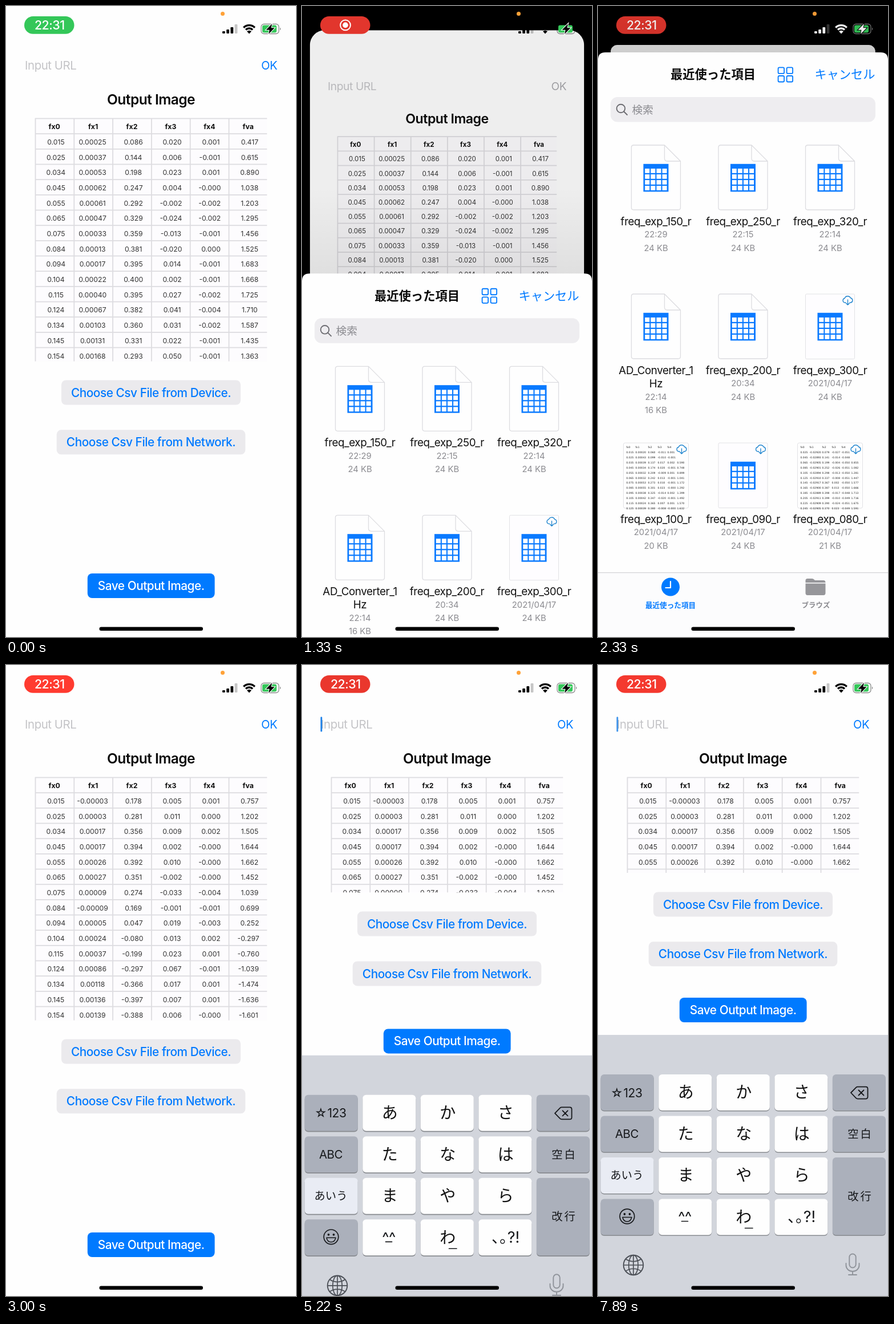
Write an HTML page that moves like this. It is 508 by 1102 pixels and loops after 8000 ms.

```html
<!DOCTYPE html>
<html lang="ja">
<head>
<meta charset="utf-8">
<style>
html, body { margin: 0; width: 100%; height: 100%; overflow: hidden; background: #000; }
svg { display: block; width: 100%; height: 100%; font-family: Inter, "Noto Sans CJK JP", sans-serif; font-optical-sizing: none; text-anchor: middle; }
text { letter-spacing: -.022em; white-space: pre; }
.n { letter-spacing: 0; }
.start { text-anchor: start; }
.tiny { letter-spacing: 0; font-family: "DejaVu Sans", sans-serif; text-anchor: start; }
</style>
</head>
<body>
<svg id="stage" viewBox="0 0 508 1102"></svg>
<script>
const BLUE = '#007aff';
const each = (n, fn) => [...Array(n).keys()].map(fn).join('');
const text = (x, y, s, size, fill, more = '') =>
  `<text x="${x}" y="${y + size * .365}" font-size="${size}" fill="${fill}" ${more}>${s}</text>`;
const rect = (x, y, w, h, r, fill, more = '') =>
  `<rect x="${x}" y="${y}" width="${w}" height="${h}" rx="${r}" fill="${fill}" ${more}/>`;
const line = (d, color, width) =>
  `<path d="${d}" fill="none" stroke="${color}" stroke-width="${width}" stroke-linecap="round" stroke-linejoin="round"/>`;
const circle = (x, y, r, fill, more = '') => `<circle cx="${x}" cy="${y}" r="${r}" fill="${fill}" ${more}/>`;

// ---- main screen ----
const fx0 = '0.015 0.025 0.034 0.045 0.055 0.065 0.075 0.084 0.094 0.104 0.115 0.124 0.134 0.145 0.154'.split(' ');
const before = `0.00025 0.086 0.020 0.001 0.417
0.00037 0.144 0.006 -0.001 0.615
0.00053 0.198 0.023 0.001 0.890
0.00062 0.247 0.004 -0.000 1.038
0.00061 0.292 -0.002 -0.002 1.203
0.00047 0.329 -0.024 -0.002 1.295
0.00033 0.359 -0.013 -0.001 1.456
0.00013 0.381 -0.020 0.000 1.525
0.00017 0.395 0.014 -0.001 1.683
0.00022 0.400 0.002 -0.001 1.668
0.00040 0.395 0.027 -0.002 1.725
0.00067 0.382 0.041 -0.004 1.710
0.00103 0.360 0.031 -0.002 1.587
0.00131 0.331 0.022 -0.001 1.435
0.00168 0.293 0.050 -0.001 1.363`;
const after = `-0.00003 0.178 0.005 0.001 0.757
0.00003 0.281 0.011 0.000 1.202
0.00017 0.356 0.009 0.002 1.505
0.00017 0.394 0.002 -0.000 1.644
0.00026 0.392 0.010 -0.000 1.662
0.00027 0.351 -0.002 -0.000 1.452
0.00009 0.274 -0.033 -0.004 1.039
-0.00009 0.169 -0.001 -0.001 0.699
0.00005 0.047 0.019 -0.003 0.252
0.00024 -0.080 0.013 0.002 -0.297
0.00037 -0.199 0.023 0.001 -0.760
0.00086 -0.297 0.067 -0.001 -1.039
0.00118 -0.366 0.017 0.001 -1.474
0.00136 -0.397 0.007 0.001 -1.636
0.00139 -0.388 0.006 -0.000 -1.601`;

const heads = ['fx0', 'fx1', 'fx2', 'fx3', 'fx4', 'fva'];
const colX = i => 84.7 + 67.9 * i;
const rowY = j => 211 + 26.67 * j;

function values(id, data) {
  const cells = data.split('\n').map((row, j) =>
    [fx0[j], ...row.split(' ')].map((v, i) =>
      text(colX(i) + (i == 1 ? -1 : v[0] == '-' ? .5 : 2.7), rowY(j + 1), v, 12.2, '#333', 'class="n"')).join(''));
  return `<g id="${id}">${cells.join('')}</g>`;
}

const table = `<g clip-path="url(#tableClip)">
  ${rect(51, 196, 406.5, 425, 0, '#fdfcfe')}
  ${each(17, j => rect(51, 195.6 + 26.67 * j, 406.5, 1.8, 0, '#dddce0'))}
  ${each(6, i => rect(50.6 + 67.8 * i, 196, 1.8, 425, 0, '#dddce0'))}
  ${heads.map((h, i) => text(colX(i), 211, h, 12.3, '#111', 'class="n" font-weight="700"')).join('')}
  ${values('before', before)}${values('after', after)}</g>`;

const button = (x, y, w, s, bg, fg, bgClass, fgClass) =>
  rect(x, y, w, 43, 8, bg, `class="${bgClass}"`) +
  text(x + w / 2, y + 21.5, s, 20.8, fg, `class="${fgClass}" font-weight="550"`);

const mainView = `<g id="main" clip-path="url(#cardClip)">
  ${rect(0, 0, 508, 1102, 0, '#fefefe')}
  ${text(33, 103.5, 'Input URL', 20.4, '#c4c4c7', 'class="start"')}
  ${rect(32.5, 90.5, 2.8, 26, 1.2, '#1a7fe8', 'id="caret"')}
  ${text(461, 103.5, 'OK', 20.2, BLUE, 'class="tint"')}
  ${text(254, 163.5, 'Output Image', 24.5, '#0a0a0a', 'font-weight="600"')}
  ${table}
  <g id="choose">
    ${button(97, 653.5, 314, 'Choose Csv File from Device.', '#ebeaed', BLUE, '', 'tint')}
    ${button(88.7, 740.3, 330.6, 'Choose Csv File from Network.', '#ebeaed', BLUE, '', 'tint')}
  </g>
  <g id="save">${button(142.8, 991, 222.8, 'Save Output Image.', BLUE, '#fff', 'tint', '')}</g>
  ${rect(0, 0, 508, 1102, 0, '#000', 'id="dim"')}
</g>`;

// ---- status bar ----
const arc = r => `M${426 - r * .7} ${47.5 - r * .7}A${r} ${r} 0 0 1 ${426 + r * .7} ${47.5 - r * .7}`;
const status = `${rect(32, 18, 87.5, 30.8, 15.4, '#34c759', 'id="pill"')}
  ${text(76.3, 33.5, '22:31', 21.4, '#fff', 'id="clock" font-weight="450"')}
  <g id="rec">${circle(76, 33.4, 8.9, 'none', 'stroke="#fff" stroke-width="2"')}${circle(76, 33.4, 4.8, '#fff')}</g>
  ${circle(379.5, 13.5, 3.5, '#ffa238')}
  <g id="icons">
    ${each(4, i => rect(379 + 7.2 * i, [44, 41, 37, 32][i], 4.8, [4, 7, 11, 16][i], 1.2, 'currentColor', i == 3 ? 'opacity=".22"' : ''))}
    <path d="${arc(14)}${arc(8.6)}" fill="none" stroke="currentColor" stroke-width="3.3"/>
    <path d="M426 48.5L422 44.3Q426 41 430 44.3Z" fill="currentColor"/>
    ${rect(447, 31.5, 31, 17, 5, 'none', 'stroke="currentColor" stroke-width="1.3" opacity=".45"')}
    <path d="M480 37.5q2.6 2.5 0 5z" fill="currentColor" opacity=".5"/>
    ${rect(449, 33.5, 25, 13, 3, '#34c759')}
    <path d="M466 31L455.5 41.8h6L460 49l10.5-10.8h-6z" fill="currentColor" stroke="var(--bg)" stroke-width="2" paint-order="stroke"/>
  </g>`;

// ---- file picker, drawn at its open position ----
const GREY = '#8b8b90';
const cloud = (x, y) => `<g transform="translate(${x} ${y})">${line('M-3.5 4H-5a3.8 3.8 0 0 1-.4-7.5A5.6 5.6 0 0 1 5-4a4.1 4.1 0 0 1 .3 8H3.5M0-1V8M-2.8 5.2L0 8L2.8 5.2', '#2387cf', 1.4)}</g>`;
const sheetIcon = (x, y) => rect(x - 22, y, 44, 48.5, 0, '#0a7aff') +
  each(16, k => rect(x - 19.2 + 10.1 * (k % 4), y + 8.2 + 10 * (k >> 2), 8, 7.8, 0, '#fff'));

// Small previews: a sampled sine with seeded noise
function preview(x, y, freq, step, drift) {
  let seed = freq;
  const noise = a => ((seed = seed * 16807 % 2147483647) / 2147483647 - .5) * a;
  const cols = [5, 21, 43, 60, 77, 94];
  const put = (v, i, j) => text(x + cols[i], y + 7.5 + 8.9 * j, v, 4.5, '#222', 'class="tiny"');
  const rows = each(12, j => {
    const at = .005 + step * (j + 1), wave = .4 * Math.sin(freq * at);
    return [at.toFixed(3), (drift + noise(.0004)).toFixed(5), wave.toFixed(3), noise(.06).toFixed(3),
      (drift * 1.7 + noise(.004)).toFixed(3), (4.3 * wave).toFixed(3)].map((v, i) => i > 4 && j < 2 ? '' : put(v, i, j + 1)).join('');
  });
  return rect(x, y, 114, 114, 3, '#fefefe', 'stroke="#e2e2e5"') +
    heads.slice(0, 5).map((h, i) => put(h, i, 0)).join('') + rows +
    circle(x + 102, y + 11, 10, '#fefefe') + cloud(x + 102, y + 11);
}

function file(k, kind, name, ...info) {
  const x = 101.5 + 152.5 * (k % 3), y = 243 + 260 * Math.floor(k / 3);
  const icon = {
    doc: () => line(`M${x - 39} ${y}h54l28 28v81q0 4-4 4h-78q-4 0-4-4v-105q0-4 4-4zM${x + 15} ${y}v23q0 5 5 5h23`, '#dcdce0', 1.3) + sheetIcon(x, y + 32.8),
    cloud: () => rect(x - 43, y, 86, 113.5, 2, '#fefdff', 'stroke="#e2e2e5"') + sheetIcon(x, y + 32.8) + cloud(x + 31, y + 11),
    p100: () => preview(x - 57, y, 10, .01, .0004),
    p080: () => preview(x - 57, y, 8, .02, -.029)
  }[kind]();
  const names = name.split(' ');
  return icon + [...names, ...info].map((s, i) => {
    const isName = i < names.length;
    return text(x, y + 132.7 + 23.3 * i, s, isName ? 18.8 : 14.8, isName ? '#111' : GREY, isName ? '' : 'class="n"');
  }).join('');
}

const date = '2021/04/17';
const sheet = `${rect(0, -69, 508, 150, 0, 'url(#shade)', 'id="shadow"')}
  <path d="M0 1110V94Q0 81 13 81H495Q508 81 508 94V1110Z" fill="#fefefe"/>
  ${text(201.5, 119.5, '最近使った項目', 21.3, '#0a0a0a', 'class="n" font-weight="700"')}
  ${each(4, k => rect(315.6 + 15 * (k % 2), 107.4 + 14.6 * (k >> 1), 10.5, 10.5, 2, 'none', `stroke="${BLUE}" stroke-width="1.8"`))}
  ${text(432.5, 119.5, 'キャンセル', 21.2, BLUE, 'class="n"')}
  ${rect(22, 159, 464, 43.5, 12, '#eeedf0')}
  ${circle(40, 179, 7.3, 'none', 'stroke="#6d6d72" stroke-width="1.9"')}${line('M45.5 184.5L51 190', '#6d6d72', 2)}
  ${text(59.5, 181, '検索', 18.7, GREY, 'class="n start"')}
  ${file(0, 'doc', 'freq_exp_150_r', '22:29', '24 KB')}
  ${file(1, 'doc', 'freq_exp_250_r', '22:15', '24 KB')}
  ${file(2, 'doc', 'freq_exp_320_r', '22:14', '24 KB')}
  ${file(3, 'doc', 'AD_Converter_1 Hz', '22:14', '16 KB')}
  ${file(4, 'doc', 'freq_exp_200_r', '20:34', '24 KB')}
  ${file(5, 'cloud', 'freq_exp_300_r', date, '24 KB')}
  ${file(6, 'p100', 'freq_exp_100_r', date, '20 KB')}
  ${file(7, 'cloud', 'freq_exp_090_r', date, '24 KB')}
  ${file(8, 'p080', 'freq_exp_080_r', date, '21 KB')}
  ${rect(0, 990, 508, 120, 0, '#fcfcfd')}${rect(0, 989, 508, 1.2, 0, '#d2d2d5')}
  ${circle(127, 1014.5, 16, BLUE)}${line('M127 1005V1016H118.5', '#fff', 2.2)}
  ${text(127, 1046, '最近使った項目', 12.6, BLUE, 'class="n" font-weight="700"')}
  <path d="M363.5 1007V1003.5Q363.5 1000 367 1000H375Q377 1000 379 1002L380 1003H395Q398.5 1003 398.5 1007Z" fill="#96969a"/>
  <path d="M363.5 1008.5H398.5V1025Q398.5 1029 395 1029H367Q363.5 1029 363.5 1025Z" fill="#96969a"/>
  ${text(381.5, 1046, 'ブラウズ', 12.4, GREY, 'class="n" font-weight="700"')}`;

// ---- keyboard, drawn at its open position ----
const DARK = '#abb0bb', INK = '#16181b', GLOBE = '#4c5057', MIC = '#8f939a';
const keyX = c => 4.7 + 101.55 * c;
const keyY = r => 715 + 72.5 * r;
const key = (c, r, fill, h = 63) =>
  rect(keyX(c), keyY(r) + 1.6, 93, h, 6, '#888b90') + rect(keyX(c), keyY(r), 93, h, 6, fill);
const kana = (c, r, s) => text(keyX(c) + 47.5, keyY(r) + 31, s, 28, '#111', 'class="n"');

const keyboard = `${rect(0, 646, 508, 470, 0, '#d2d5dc')}
  ${each(4, r => key(0, r, r == 2 ? '#e9ecf4' : DARK))}
  ${each(12, k => key(1 + k % 3, Math.floor(k / 3), '#fefefe'))}
  ${key(4, 0, DARK)}${key(4, 1, DARK)}${key(4, 2, DARK, 135.5)}
  ${[...'あかさたなはまやらわ'].map((s, k) => kana(k == 9 ? 2 : 1 + k % 3, Math.floor(k / 3), s)).join('')}
  ${text(152, 964, '^^', 26, INK)}${line('M146.5 971.5H157.5', INK, 1.7)}
  ${line('M257.5 983.5H271', INK, 1.6)}
  ${text(357, 963, '､｡?!', 27, INK, 'class="n"')}
  ${text(33, 747, '☆', 21, INK, 'class="n"')}${text(61, 747, '123', 21, INK)}
  ${text(50.5, 819, 'ABC', 20.5, INK)}
  ${text(50.5, 891, 'あいう', 19.3, INK, 'class="n"')}
  ${text(459.5, 819, '空白', 19.3, INK, 'style="letter-spacing:3px"')}
  ${text(459.5, 927.5, '改行', 19.3, INK, 'style="letter-spacing:3px"')}
  ${line('M443 747l9-9.2q1.2-1.2 3-1.2h14q3.5 0 3.5 3.5v14q0 3.5-3.5 3.5h-14q-1.8 0-3-1.2zM456.5 742.5l9 9m0-9l-9 9', INK, 1.8)}
  ${circle(51, 963, 12.8, 'none', `stroke="${INK}" stroke-width="1.7"`)}
  ${circle(46.5, 959, 1.9, INK)}${circle(55.5, 959, 1.9, INK)}
  ${line('M43 964.5H59Q57.5 972 51 972T43 964.5Z', INK, 1.5)}
  ${circle(62, 1048, 17.3, 'none', `stroke="${GLOBE}" stroke-width="1.9"`)}
  <ellipse cx="62" cy="1048" rx="8.3" ry="17.3" fill="none" stroke="${GLOBE}" stroke-width="1.7"/>
  ${line('M62 1031V1065M45 1048H79M48.5 1037.5Q62 1046 75.5 1037.5M48.5 1058.5Q62 1050 75.5 1058.5', GLOBE, 1.7)}
  ${rect(440.3, 1028.5, 11.4, 24, 5.7, 'none', `stroke="${MIC}" stroke-width="1.9"`)}
  ${line('M434.5 1045V1048.5a11.5 10.5 0 0 0 23 0V1045M446 1059V1065M439 1065H453', MIC, 1.9)}`;

stage.innerHTML = `<defs>
    <clipPath id="tableClip"><rect id="tableBox" x="50" y="195" width="407.5"/></clipPath>
    <clipPath id="cardClip"><rect id="cardBox" width="508" height="1102"/></clipPath>
    <linearGradient id="shade" x2="0" y2="1"><stop stop-opacity="0"/><stop offset="1" stop-opacity=".1"/></linearGradient>
  </defs>
  ${mainView}${status}<g id="sheet">${sheet}</g><g id="keys">${keyboard}</g>
  ${rect(163.5, 1084.5, 181.5, 6.5, 3.2, '#000')}`;

// ---- motion ----
const set = (id, name, value) => document.getElementById(id).setAttribute(name, value);
const move = (id, y) => set(id, 'transform', `translate(0 ${y})`);
const show = (id, on) => set(id, 'opacity', +on);
const ramp = (t, a, b) => Math.min(1, Math.max(0, (t - a) / (b - a)));
const mix = (a, b, k) => a.map((v, i) => v + (b[i] - v) * k);
const tints = document.querySelectorAll('.tint');

// Critically damped spring from 0 to 1
function spring(t, start, speed) {
  const x = Math.max(0, t - start) / 1000 * speed;
  const p = 1 - (1 + x) * Math.exp(-x);
  return p > .998 ? 1 : p;
}

function draw(t) {
  // Recording pill: turns red, then pulses once a second
  const red = mix([255, 59, 48], [222, 53, 44], Math.abs(Math.sin(Math.PI * t / 1000)) * ramp(t, 900, 1200));
  const rec = ramp(t, 330, 560) - ramp(t, 1670, 1890);
  set('pill', 'fill', `rgb(${mix([52, 199, 89], red, ramp(t, 110, 560))})`);
  show('rec', rec);
  show('clock', 1 - rec);

  // File picker
  const open = spring(t, 1183, 14) - spring(t, 2370, 14);
  const scale = 1 - .087 * open;
  set('main', 'transform', `translate(${254 * (1 - scale)} ${68 * open}) scale(${scale})`);
  set('cardBox', 'rx', open > 0 ? 52 - 39 * open : 0);
  set('dim', 'opacity', .1 * open);
  move('sheet', 1021 * (1 - open));
  show('sheet', open > 0);
  show('shadow', open);
  tints.forEach(el => el.setAttribute('fill', open > .03 ? '#a9a9ad' : BLUE));
  set('icons', 'style', open > .8 ? 'color:#fff;--bg:#000' : 'color:#000;--bg:#fff');
  show('before', t < 2430);
  show('after', t >= 2430);

  // Keyboard, with the layout trailing slightly
  const layout = spring(t, 5079.3, 24.7);
  move('keys', 456 * (1 - spring(t, 5052.5, 24.7)));
  move('choose', -257 * layout);
  move('save', -410 * layout);
  set('tableBox', 'height', 425.5 - 257.5 * layout);
  const blink = (t - 5050) % 1000;
  show('caret', t < 5050 ? 0 : 1 - ramp(blink, 500, 640) + ramp(blink, 720, 860));
}

function tick(now) {
  draw(Math.floor(now % 8000 * .009 + .05) / .009);
  requestAnimationFrame(tick);
}
draw(0);
requestAnimationFrame(tick);
</script>
</body>
</html>
```
